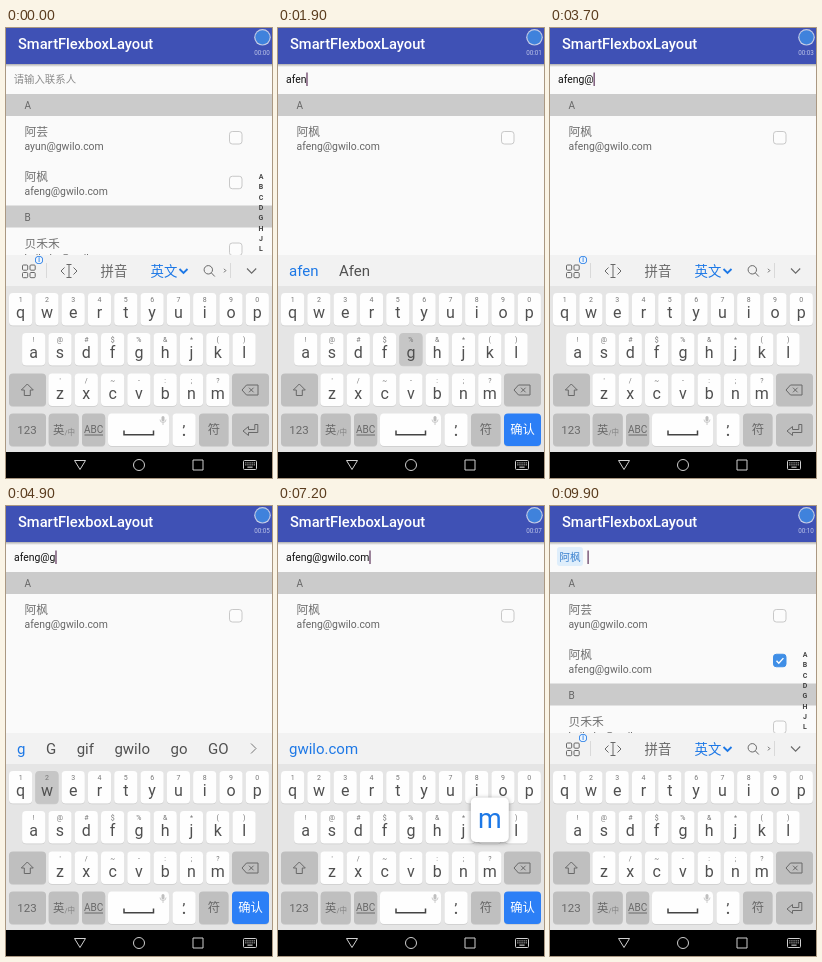
Animation of 266x450 px, one loop 10 s. Source, as an HTML page with a canvas:

```html
<!DOCTYPE html>
<html lang="zh">
<head>
<meta charset="utf-8">
<title>SmartFlexboxLayout</title>
<style>
html, body { margin: 0; width: 100%; height: 100%; overflow: hidden; background: #fafafa; }
canvas { display: block; width: 266px; height: 450px; }
</style>
</head>
<body>
<canvas id="stage"></canvas>
<script>
const W = 266, H = 450, LOOP = 10000;
const BLUE = '#1d78e6', INK = '#505050', SOFT = '#686868', GREY = '#bfbfbf', PRESSED = '#c6c6c6';
const canvas = document.getElementById('stage'), g = canvas.getContext('2d');
const ratio = window.devicePixelRatio || 1;
canvas.width = W * ratio;
canvas.height = H * ratio;

// Key presses: a key darkens, 100 ms later its letter appears.
const presses = [[300, 'a'], [1300, 'f'], [1500, 'e'], [1700, 'n'], [1900, 'g'],
  [2500, '符'], [3400, '@'], [4300, 'g'], [4900, 'w'], [5200, 'i'], [5400, 'l'],
  [5800, 'o'], [6300, '.'], [6400, 'c'], [6700, 'o'], [7100, 'm']];
const PANEL_ON = 2700, PANEL_OFF = 3600, CHECK = 8700, RESET = 8800;
const caretOff = [[3900, 4100], [7700, 8100], [9300, 9800]];
const contacts = [['A', '阿芸', 'ayun@gwilo.com'], ['A', '阿枫', 'afeng@gwilo.com'],
  ['B', '贝禾禾', 'beihehe@gwilo.com']];
const guesses = { a: ['a', 'A', 'an', 'and', 'at', 'as'], g: ['g', 'G', 'gif', 'gwilo', 'go', 'GO'] };
const rows = [
  { y: 265, x: 14.6, keys: 'qwertyuiop', hints: '1234567890' },
  { y: 305, x: 27.7, keys: 'asdfghjkl', hints: '!@#$%&*()' },
  { y: 345.5, x: 54, keys: 'zxcvbnm', hints: "'/~-:;?" }
];
const PITCH = 26.3;

const inside = (t, [a, b]) => t >= a && t < b;

function font(size, weight = 400) {
  g.font = `${weight} ${size}px Roboto, "Noto Sans CJK SC", "Noto Sans CJK", sans-serif`;
}
function text(s, x, y, size, color, align = 'left', weight) {
  font(size, weight);
  g.fillStyle = color;
  g.textAlign = align;
  g.fillText(s, x, y);
}
function rect(x, y, w, h, color) {
  g.fillStyle = color;
  g.fillRect(x, y, w, h);
}
function box(x, y, w, h, r, fill, stroke) {
  g.beginPath();
  g.roundRect(x, y, w, h, r);
  if (fill) { g.fillStyle = fill; g.fill(); }
  if (stroke) { g.strokeStyle = stroke; g.lineWidth = 1; g.stroke(); }
}
function line(d, color = INK, width = 1.1, x = 0, y = 0) {
  g.save();
  g.translate(x, y);
  g.strokeStyle = color;
  g.lineWidth = width;
  g.stroke(new Path2D(d));
  g.restore();
}
function disc(x, y, r, fill) {
  g.beginPath();
  g.arc(x, y, r, 0, 7);
  g.fillStyle = fill;
  g.fill();
}
function key(x, y, w, fill = '#fff', h = 32.5) {
  box(x, y + 0.8, w, h, 4, '#cbcbcb');
  box(x, y, w, h, 4, fill);
}

function stateAt(t) {
  const s = { t, typed: '', word: '', down: '', popup: '' };
  for (const [at, k] of presses) {
    if (inside(t, [at, at + 100])) s.down = k;
    if (t < at + 100) continue;
    if (k !== '符') s.typed += k;
    s.word = k === '符' || k === '@' ? '' : s.word + k;
    if (t < at + 200 && /[a-z]/.test(k)) s.popup = k;
  }
  if (t >= RESET) s.typed = s.word = '';
  s.panel = inside(t, [PANEL_ON, PANEL_OFF]);
  s.caret = (s.typed || t >= RESET) && !caretOff.some(span => inside(t, span));
  return s;
}

function drawHeader(t) {
  rect(0, 0, W, 36, '#3f51b5');
  const shadow = g.createLinearGradient(0, 36, 0, 39);
  shadow.addColorStop(0, 'rgba(0,0,0,.3)');
  shadow.addColorStop(1, 'rgba(0,0,0,0)');
  rect(0, 36, W, 3, shadow);
  text('SmartFlexboxLayout', 12, 21, 14.7, '#fff', 'left', 500);
  disc(256.5, 9.3, 8.3, '#c3cae4');
  disc(256.5, 9.3, 7.1, '#3f82dc');
  const sec = Math.floor(t / 1000 * 1.012 + 0.05);
  text('00:' + String(sec).padStart(2, '0'), 256, 27, 6.3, '#bcc4e8', 'center');
}

function drawInput(s) {
  let x = 8;
  if (s.t >= RESET) {
    box(7, 41, 26, 19, 3, '#dfeefb');
    text('阿枫', 9.3, 54.5, 10.7, '#3d83cf');
    x = 37.5;
  } else if (s.typed) {
    text(s.typed, 8, 54.5, 10.4, '#111');
    x += g.measureText(s.typed).width;
  } else {
    text('请输入联系人', 7.7, 55, 10.4, '#8c8c8c');
  }
  if (s.caret) rect(x, 44.5, 1.2, 13.5, '#5f355c');
}

function drawCheckbox(y, on) {
  box(223.5, y, 12.5, 12.5, 2.8, on ? '#3f8ee6' : '#fcfcfc', on ? '#3f8ee6' : '#c8c8c8');
  if (on) line('M226.5 6.5l2.3 2.4 4.6-5', '#fff', 1.4, 0, y);
}

function drawList(s) {
  g.save();
  g.beginPath();
  g.rect(0, 66, W, 161);
  g.clip();
  let y = 66, section = '';
  for (const [letter, name, mail] of contacts) {
    if (!mail.includes(s.typed)) continue;
    if (letter !== section) {
      rect(0, y, W, 22, '#cbcbcb');
      text(letter, 18.5, y + 15, 10, '#666');
      y += 22;
      section = letter;
    }
    text(name, 18.5, y + 20, 11.8, '#707070');
    text(mail, 18.5, y + 34, 10.4, '#666');
    drawCheckbox(y + 15.5, name === '阿枫' && s.t >= CHECK);
    y += 44.75;
  }
  if (!s.typed) [...'ABCDGHJL'].forEach((c, i) =>
    text(c, 255, 151 + i * 10.35, 7, '#444', 'center', 700));
  g.restore();
}

function drawTools() {
  for (const x of [16.5, 24]) for (const y of [237, 244.5]) box(x, y, 5.2, 5.2, 1, null, SOFT);
  disc(33, 232, 4, BLUE);
  disc(33, 232, 3.2, '#eef5fd');
  text('i', 33, 234.4, 6.5, BLUE, 'center', 500);
  for (const x of [40, 224]) rect(x, 235, 0.8, 15, '#d2d2d2');
  line('M58.5 239.5l-3.5 3.5 3.5 3.5M67.5 239.5l3.5 3.5-3.5 3.5M60.5 236.5h5M60.5 249.5h5M63 236.5v13', SOFT, 1);
  text('拼音', 108, 247.5, 13.4, SOFT, 'center');
  text('英文', 158, 247.5, 13.4, BLUE, 'center');
  line('M173.5 241l4 4 4-4', BLUE, 1.8);
  line('M206.5 241.8a4.2 4.2 0 1 0-8.4 0a4.2 4.2 0 1 0 8.4 0M205.3 244.8l3.5 3.7', SOFT, 1);
  line('M218 240.8l1.8 1.8-1.8 1.8', SOFT, 1);
  line('M241 240.5l4.6 4.6 4.6-4.6', SOFT, 1.1);
}

function drawGuesses(word) {
  const list = guesses[word] ||
    (word.length < 5 && word[0] === 'a' ? [word, 'A' + word.slice(1)] : [word]);
  let x = 11;
  list.forEach((w, i) => {
    text(w, x, 247.7, 15, i ? INK : BLUE);
    x += g.measureText(w).width + 20.5;
  });
  if (list.length > 2) line('M245 237.5l5 5-5 5', '#777', 1);
}

const backspace = 'M-8 0l4.5-5H8V5H-3.5ZM-1-2.3l4.6 4.6M3.6-2.3l-4.6 4.6';

function drawKeyboard(s) {
  rect(0, 258, W, 166, '#e5e5e5');
  for (const row of rows) [...row.keys].forEach((k, i) => {
    const x = row.x + i * PITCH;
    key(x - 11.6, row.y, 23.2, s.down === k ? PRESSED : '#fefefe');
    text(row.hints[i], x, row.y + 9.3, 7, '#777', 'center');
    text(k, x, row.y + 25.2, 16, INK, 'center');
  });
  key(3, 345.5, 37, GREY);
  line('M0-6l6 6h-3v5.5h-6V0h-3Z', SOFT, 1, 21.3, 362);
  key(226, 345.5, 37, GREY);
  line(backspace, SOFT, 1, 244, 362);

  const y = 385.5;
  key(3, y, 37, GREY);
  text('123', 21, y + 20.7, 11.5, SOFT, 'center');
  key(42.7, y, 30, GREY);
  text('英', 47, y + 20.3, 11.3, SOFT);
  text('/中', 58.5, y + 21, 7.5, '#808080');
  key(76, y, 23.2, GREY);
  text('ABC', 87.6, y + 19.3, 10, SOFT, 'center');
  line('M78.5 407h18.5', SOFT, 1);
  key(102, y, 61, '#fefefe');
  line('M118 402.5v4.3h29.5v-4.3', '#444', 1.5);
  box(155.5, 388, 3, 5.5, 1.5, '#bfbfbf');
  line('M154 391.5a3 3 0 0 0 6 0M157 394.5v2.5', '#bfbfbf', 0.8);
  key(166.5, y, 23.2, s.down === '.' ? PRESSED : '#fefefe');
  text(',', 178, y + 12, 13, INK, 'center', 500);
  text('.', 178, y + 22.5, 14, INK, 'center', 700);
  key(193, y, 29.5, s.down === '符' ? '#a5a5a5' : GREY);
  text('符', 207.8, y + 20.7, 12.3, SOFT, 'center');
  key(226, y, 37, s.word ? '#2c7ff6' : GREY);
  if (s.word) text('确认', 244.5, y + 20.8, 12.3, '#fff', 'center');
  else line('M4.3-5.5h3v8H-2v3l-5.5-4.5L-2-3.5v3h6.3Z', SOFT, 1, 244.5, 402);
}

function drawPopup(k) {
  const row = rows.find(r => r.keys.includes(k));
  const x = row.x + row.keys.indexOf(k) * PITCH;
  const left = Math.min(Math.max(x - 19, 2), W - 40);
  g.save();
  g.shadowColor = 'rgba(0,0,0,.4)';
  g.shadowBlur = 4 * ratio;
  g.shadowOffsetY = ratio;
  box(left, row.y - 54, 38, 44.5, 5, '#fff');
  g.restore();
  text(k, left + 19, row.y - 23.5, 27, BLUE, 'center');
}

function drawPanel(s) {
  rect(0, 227, W, 197, '#e3e3e3');
  box(3, 230, 38, 157.5, 4, '#fcfcfc', '#d6d6d6');
  ['最近', '中文符', '英文符', '表情图', '表情符'].forEach((c, i) =>
    text(c, 22, 248.7 + i * 31.4, 10.7, i === 2 ? '#3f78cc' : INK, 'center'));
  box(44, 230, 219, 157.5, 4, '#fcfcfc', '#d6d6d6');
  [...`,.?!:/@…";'~()<>`].forEach((c, i) => {
    const col = i % 4, x = 44 + col * 54.75, y = 230 + (i >> 2) * 39.4;
    if (c === s.down) rect(x, y, 54.75, 39.4, '#d4d4d4');
    text(c, x + 27.4, y + 24, 12.5, '#333', 'center');
  });
  for (let i = 1; i < 4; i++) {
    rect(44 + i * 54.75, 230, 0.8, 157, '#e0e0e0');
    rect(44, 230 + i * 39.4, 219, 0.8, '#e6e6e6');
  }
  box(37.5, 233, 2, 34, 1, '#d2d2d2');
  box(260.5, 235, 2, 79, 1, '#d8d8d8');
  box(21, 404, 11.5, 7.5, 1, null, INK);
  line('M23.5 404v-3a3 3 0 0 1 6-.5M26.7 406.5v2.5');
  line('M73.5 408l6.5-6 6.5 6', '#bdbdbd', 1.2);
  line('M126.5 402l6.5 6 6.5-6', INK, 1.2);
  line(backspace, INK, 1.1, 186, 405);
  text('返回', 240, 409, 12, SOFT, 'center');
}

function drawNav() {
  rect(0, 424, W, 26, '#000');
  const c = '#d0d0d0';
  line('M68.5 432.5h11l-5.5 9Z', c, 1);
  line('M138.5 437a5.5 5.5 0 1 0-11 0a5.5 5.5 0 1 0 11 0', c, 1);
  line('M187 432h10v10h-10Z', c, 1);
  box(237.5, 432.5, 13, 9, 1, null, c);
  for (const y of [434.3, 436.3]) for (let x = 239.3; x < 249; x += 2.1) rect(x, y, 1.1, 1.1, c);
  rect(241.4, 438.6, 5.2, 1.1, c);
}

function draw(now) {
  const s = stateAt(now % LOOP);
  g.setTransform(ratio, 0, 0, ratio, 0, 0);
  rect(0, 0, W, H, '#fafafa');
  drawHeader(s.t);
  drawInput(s);
  drawList(s);
  if (s.panel) {
    drawPanel(s);
  } else {
    rect(0, 227, W, 31, '#f2f2f2');
    if (s.word) drawGuesses(s.word); else drawTools();
    drawKeyboard(s);
    if (s.popup) drawPopup(s.popup);
  }
  drawNav();
}

const start = performance.now();
function tick() {
  draw(performance.now() - start);
  requestAnimationFrame(tick);
}
tick();
</script>
</body>
</html>
```
